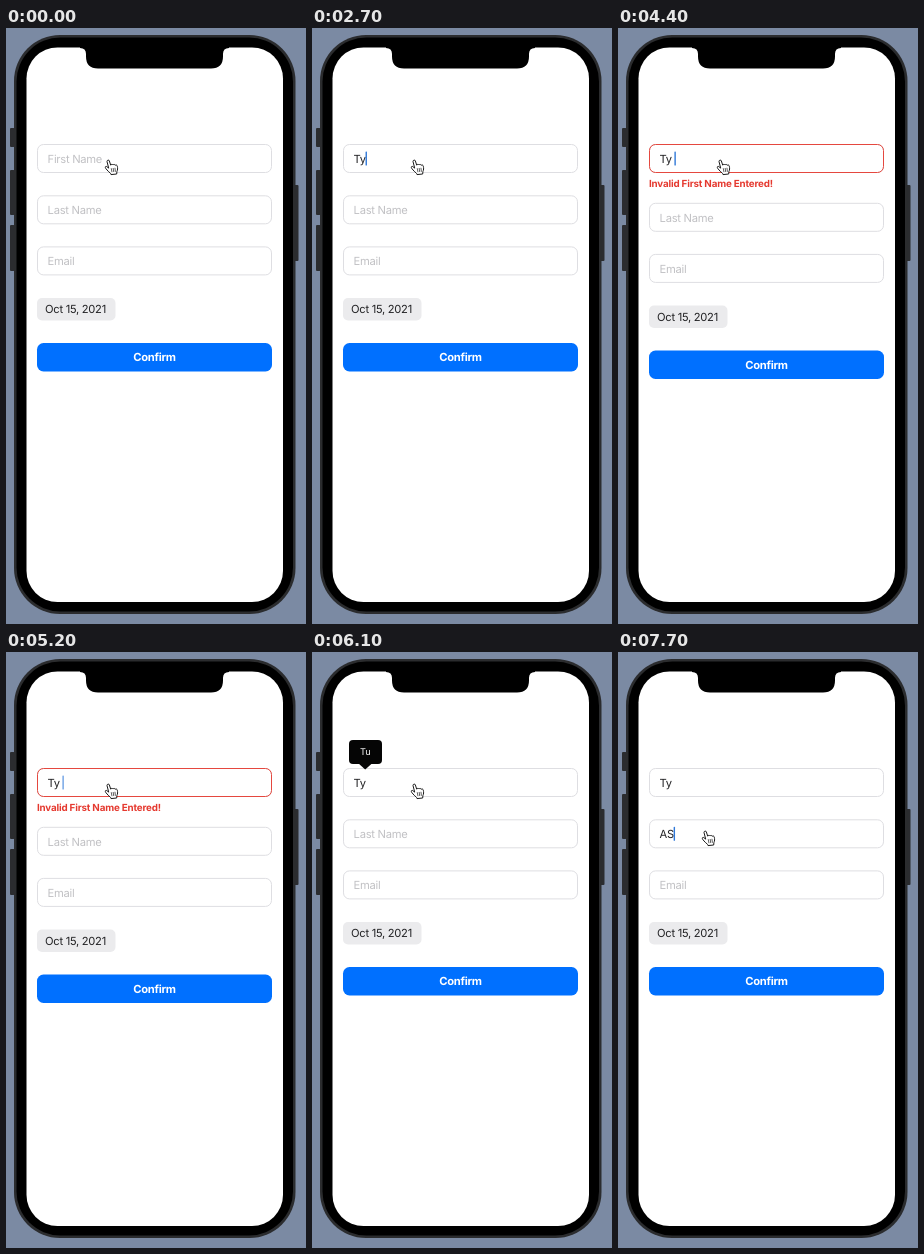
Write an HTML page with a canvas that moves like this. It is 300 px wide and 596 px high and loops after 8000 ms.

```html
<!DOCTYPE html>
<html lang="en">
<head>
<meta charset="utf-8">
<title>Form validation</title>
<style>
  html, body { margin: 0; width: 100%; height: 100%; overflow: hidden; background: #7b8aa3; }
  canvas { display: block; width: 300px; height: 596px; }
</style>
</head>
<body>
<canvas></canvas>
<script>
const LOOP = 8000, STEP = 100;
const FONT = 'Inter, Roboto, sans-serif';
const INK = '#222224', HINT = '#c1c1c4', BORDER = '#dedee2', BLUE = '#0070ff';

const canvas = document.querySelector('canvas');
const scale = window.devicePixelRatio || 1;
canvas.width = 300 * scale;
canvas.height = 596 * scale;
const ctx = canvas.getContext('2d');
ctx.scale(scale, scale);
ctx.textRendering = 'geometricPrecision';

// [start time, value] lists, ordered by time
const FIRST_NAME = [[0, ''], [1400, 'T'], [1700, 'Tu'], [1900, 'T'], [2300, 'Ty'], [2800, 'Ty '], [5300, 'Ty']];
const LAST_NAME = [[0, ''], [7300, 'A'], [7700, 'AS']];
const FIRST_CARET = [[0, 0], [100, 1], [800, 0], [1100, 1], [3300, 0], [3700, 1], [4000, 0],
  [4300, 1], [4900, 0], [5200, 1], [5700, 0]];
const LAST_CARET = [[0, 0], [6600, 1]];

const HAND = new Path2D('M3 2.2C3 .8 5 .5 5.4 2L6.7 6.2C7 5.2 8.6 5 9 6C9.6 5.1 10.9 5.3 11.2 6.3' +
  'C12 5.6 13.1 6 13.3 7.2C13.8 9 13.7 11 12.9 12.6L12.7 15L7 15.6L6.6 14.4' +
  'C5 13 3.5 11.8 2 9.8C.6 8 1.6 6.9 2.8 7.6L4.4 8.9Z');
const KNUCKLES = new Path2D('M7.3 9.6l.6 3.2M9.2 9.4l.5 3.2M11 9.2l.4 3.2');
const NOTCH = new Path2D('M74 19V20Q80 20 80 26V28.5Q80 40.5 92 40.5H205Q217 40.5 217 28.5V26Q217 20 223 20V19Z');
const POINTER = new Path2D('M46 111H60.5L53.2 117.5Z');

const valueAt = (track, t) => track.findLast(([start]) => t >= start)[1];
const ramp = (t, from, to) => Math.min(1, Math.max(0, (t - from) / (to - from)));
const ease = (t, from, to) => { const p = ramp(t, from, to); return p * p * (3 - 2 * p); };

// A caret takes one intermediate step whenever it switches on or off
function caretAlpha(track, t) {
  const before = valueAt(track, Math.max(0, t - STEP));
  return before * 0.3 + valueAt(track, t) * 0.7;
}

function box(x, y, w, h, r, fill, stroke) {
  ctx.beginPath();
  ctx.roundRect(x, y, w, h, r);
  if (fill) { ctx.fillStyle = fill; ctx.fill(); }
  if (stroke) { ctx.strokeStyle = stroke; ctx.lineWidth = 1; ctx.stroke(); }
}

function label(text, x, y, color, { size = 11.2, weight = 400, align = 'left', spacing = -0.28 } = {}) {
  ctx.font = `${weight} ${size}px ${FONT}`;
  ctx.letterSpacing = spacing + 'px';
  ctx.textAlign = align;
  ctx.fillStyle = color;
  ctx.fillText(text, x, y);
  return ctx.measureText(text).width;
}

function withAlpha(alpha, draw) {
  if (alpha <= 0) return;
  ctx.save();
  ctx.globalAlpha = alpha;
  draw();
  ctx.restore();
}

function field(y, hint, value = '', caret = 0, error = 0) {
  box(31.5, y + 0.5, 234, 28, 6, '#fff', BORDER);
  withAlpha(error, () => box(31.5, y + 0.5, 234, 28, 6, null, '#e5483f'));
  const width = label(value || hint, 41.6, y + 18.8, value ? INK : HINT);
  withAlpha(caret, () => box(41.3 + (value ? width : 0), y + 7.5, 1.4, 14, 0.6, '#2f78d8'));
}

function phone() {
  ctx.fillStyle = '#7b8aa3';
  ctx.fillRect(0, 0, 300, 596);
  for (const [x, y, h] of [[4, 100, 19], [4, 142, 45], [4, 197, 46], [288, 157, 76]])
    box(x, y, 4.5, h, 1, '#2b2c2f');
  box(8, 7, 281.5, 579, 46, '#2b2c2e');
  box(10.5, 9.5, 276.5, 574, 44, '#000');
  box(20.5, 19.5, 256.5, 554.5, 31, '#fff');
  ctx.fillStyle = '#000';
  ctx.fill(NOTCH);
}

function tooltip() {
  box(37, 88, 33, 24, 4, '#050505');
  ctx.fill(POINTER);
  label('Tu', 53.4, 103.3, '#fff', { size: 9.2, align: 'center', spacing: 0 });
}

function pointerHand(t) {
  const p = ease(t, 6100, 6500);
  ctx.save();
  ctx.translate(98 - 15 * p, 131 + 47 * p);
  ctx.lineJoin = ctx.lineCap = 'round';
  ctx.strokeStyle = '#1a1a1a';
  ctx.fillStyle = '#fff';
  ctx.lineWidth = 1;
  ctx.fill(HAND);
  ctx.stroke(HAND);
  ctx.lineWidth = 0.7;
  ctx.stroke(KNUCKLES);
  ctx.restore();
}

function draw(t) {
  const error = ease(t, 2700, 3100) - ease(t, 5200, 5500);
  const shift = 7.5 * error;

  phone();
  withAlpha(error, () => label('Invalid First Name Entered!', 31, 159.4, '#e5392f',
    { size: 9.8, weight: 700, spacing: -0.17 }));
  field(116, 'First Name', valueAt(FIRST_NAME, t), caretAlpha(FIRST_CARET, t), error);
  field(167.3 + shift, 'Last Name', valueAt(LAST_NAME, t), caretAlpha(LAST_CARET, t));
  field(218.4 + shift, 'Email');
  box(31, 270 + shift, 78.5, 22.5, 5, '#ebebed');
  label('Oct 15, 2021', 39, 285.3 + shift, INK);
  box(31, 315 + shift, 235, 28.5, 6.5, BLUE);
  label('Confirm', 148.5, 333.3 + shift, '#fff', { weight: 700, align: 'center' });
  withAlpha(ramp(t, 5600, 5900) - ramp(t, 6500, 6800), tooltip);
  pointerHand(t);
}

function tick() {
  const t = performance.now() % LOOP;
  draw(Math.floor(t / STEP) * STEP);
  requestAnimationFrame(tick);
}
tick();
</script>
</body>
</html>
```
